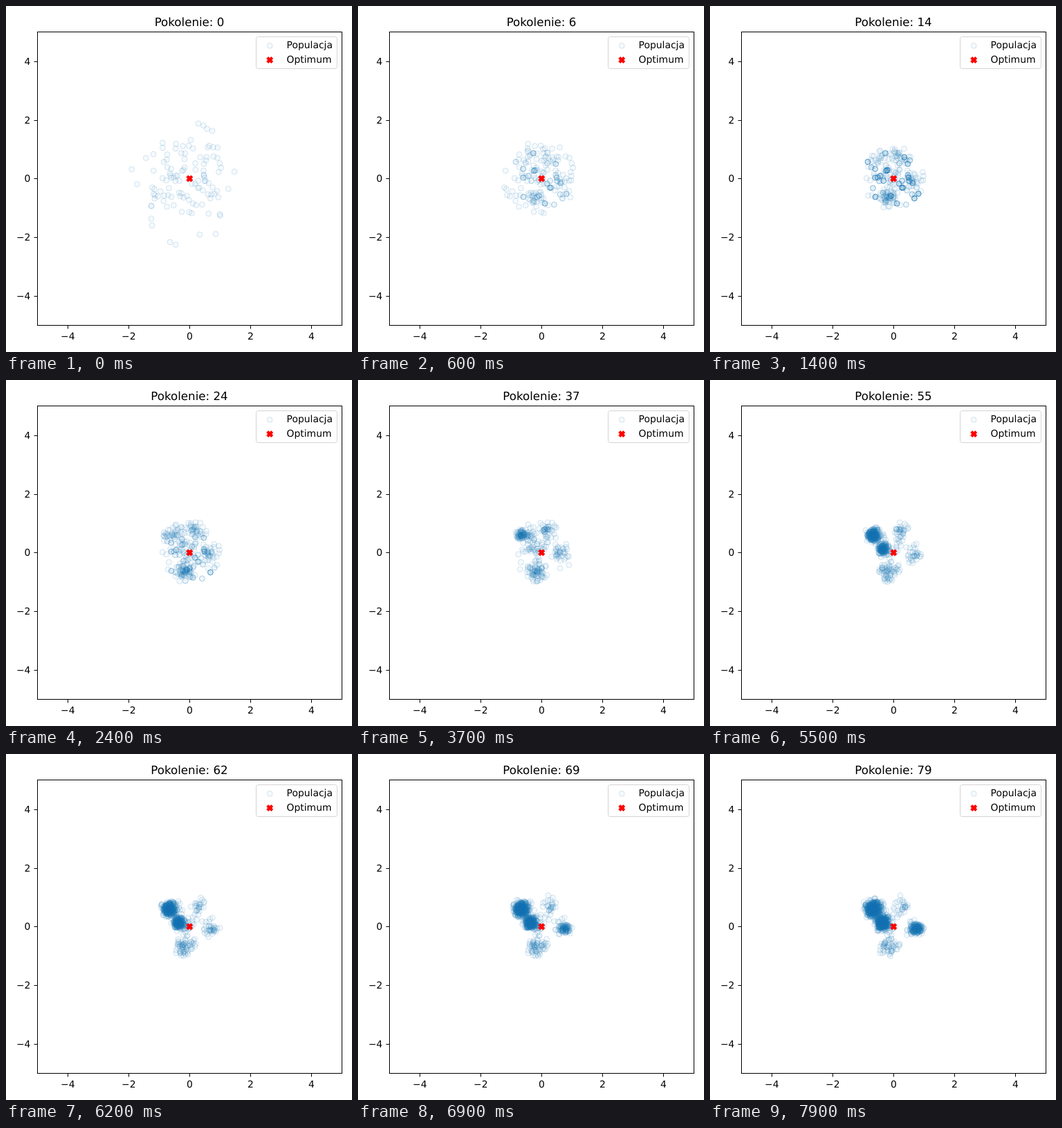
These frames come from a looping animation (500x500 px, 8000 ms). An HTML page with a canvas:

```html
<!DOCTYPE html>
<html lang="pl">
<head>
<meta charset="utf-8">
<title>Pokolenie</title>
<style>
  html, body { margin: 0; width: 100%; height: 100%; overflow: hidden; background: #fff; }
  canvas { display: block; width: 500px; height: 500px; }
</style>
</head>
<body>
<canvas id="plot" width="500" height="500"></canvas>
<script>
const ctx = document.getElementById('plot').getContext('2d');
const STEP = 100, GENERATIONS = 80;
const CX = 265, CY = 249.4, UX = 44, UY = 42.4;
const FONT = '"DejaVu Sans", sans-serif';

// Small groups that keep renewing themselves
const niches = [
  { x: 259, y: 277, births: 190 },
  { x: 275, y: 219, births: 100 },
  { x: 293, y: 252, births: 90 },
  { x: 240, y: 225, births: 90 },
  { x: 260, y: 245, births: 90 }
];

// Dense groups that start late and keep growing
const colonies = [
  { x: 236, y: 224, first: 32, rate: 10 },
  { x: 249, y: 244, first: 42, rate: 11 },
  { x: 298, y: 252, first: 61, rate: 8 }
];

let seed = 21;
function rand() {
  seed = (seed + 0x6D2B79F5) | 0;
  let t = Math.imul(seed ^ (seed >>> 15), 1 | seed);
  t = (t + Math.imul(t ^ (t >>> 7), 61 | t)) ^ t;
  return ((t ^ (t >>> 14)) >>> 0) / 4294967296;
}
const between = (a, b) => a + (b - a) * rand();

// Bell-shaped scatter with the far tail cut off
function scatter(x, y, spread, cut = 0.9) {
  const r = spread * Math.sqrt(-2 * Math.log(1 - cut * rand()));
  const a = between(0, 2 * Math.PI);
  return [x + r * Math.cos(a), y + r * Math.sin(a)];
}

const people = [];
const add = ([x, y], birth, death) => people.push({ x, y, birth, death });

// The first generation: the far ones die out, the near ones leave copies
function addFounders(count) {
  for (let i = 0; i < count; i++) {
    const spot = scatter(263, 254, 41, 0.95);
    const r = Math.hypot((spot[0] - CX) / UX, (spot[1] - CY) / UY);
    if (r > 1.03) {
      const near = Math.max(0, Math.min(1, (2.6 - r) / 1.6));
      add(spot, 0, Math.round(1 + 8 * near * near));
      continue;
    }
    add(spot, 0, between(18, 50));
    const copies = Math.floor(7 * rand() ** 2);
    for (let k = 0; k < copies; k++) add(spot, between(1, 13), between(15, 34));
  }
}

function addNiche({ x, y, births }) {
  for (let i = 0; i < births; i++) {
    const birth = 1 + 75 * rand() ** 1.4;
    add(scatter(x, y, 8), birth, birth + between(16, 40));
  }
}

function addColony({ x, y, first, rate }) {
  for (let i = 0; i < rate * (GENERATIONS - first); i++) {
    const age = i / rate;
    add(scatter(x, y, 3.6 + 0.1 * age), first + age, GENERATIONS);
  }
}

addFounders(112);
niches.forEach(addNiche);
colonies.forEach(addColony);
people.sort((a, b) => a.birth - b.birth);

function dot(x, y) {
  ctx.beginPath();
  ctx.arc(x, y, 3.9, 0, 2 * Math.PI);
  ctx.fillStyle = 'rgba(31,119,180,0.04)';
  ctx.fill();
  ctx.strokeStyle = 'rgba(31,119,180,0.18)';
  ctx.lineWidth = 1;
  ctx.stroke();
}

function cross(x, y) {
  const h = 4.17;
  ctx.beginPath();
  // Three corners per quarter turn
  for (let i = 0; i < 4; i++) {
    const c = [1, 0, -1, 0][i], s = [0, 1, 0, -1][i];
    for (const [u, v] of [[-0.5, -1], [0, -0.5], [0.5, -1]]) {
      ctx.lineTo(x + h * (u * c - v * s), y + h * (u * s + v * c));
    }
  }
  ctx.closePath();
  ctx.fillStyle = ctx.strokeStyle = '#f00';
  ctx.lineWidth = 1.2;
  ctx.fill();
  ctx.stroke();
}

function text(str, x, y, align, size = 13.89) {
  ctx.font = size + 'px ' + FONT;
  ctx.textRendering = 'geometricPrecision';
  ctx.textAlign = align;
  ctx.fillStyle = '#000';
  ctx.fillText(str, x, y);
}

function line(x1, y1, x2, y2) {
  ctx.beginPath();
  ctx.moveTo(x1, y1);
  ctx.lineTo(x2, y2);
  ctx.stroke();
}

function axes() {
  ctx.strokeStyle = '#000';
  ctx.lineWidth = 1;
  ctx.strokeRect(45.5, 37.5, 440, 424);
  for (let v = -4; v <= 4; v += 2) {
    const label = String(v).replace('-', '\u2212');
    const x = CX + v * UX + 0.5;
    const y = Math.round(CY - v * UY) + 0.5;
    line(x, 462, x, 466.5);
    line(40.5, y, 45, y);
    text(label, x - 0.2, 482, 'center');
    text(label, 35.4, y + 4.5, 'right');
  }
}

function legend() {
  ctx.beginPath();
  ctx.roundRect(361.5, 44.5, 117, 46, 3);
  ctx.fillStyle = 'rgba(255,255,255,0.8)';
  ctx.fill();
  ctx.strokeStyle = '#d4d4d4';
  ctx.lineWidth = 1;
  ctx.stroke();
  dot(381.2, 57.4);
  cross(381.2, 78);
  text('Populacja', 405.6, 61, 'left');
  text('Optimum', 405.6, 82, 'left');
}

function draw(gen) {
  ctx.fillStyle = '#fff';
  ctx.fillRect(0, 0, 500, 500);
  for (const p of people) {
    if (p.birth <= gen && gen < p.death) dot(p.x, p.y);
  }
  cross(CX + 0.3, CY);
  axes();
  text('Pokolenie: ' + gen, 265, 29, 'center', 16.67);
  legend();
}

let start = null, shown = 0;
function tick(now) {
  if (start === null) start = now;
  const gen = Math.floor((now - start) / STEP) % GENERATIONS;
  if (gen !== shown) draw(shown = gen);
  requestAnimationFrame(tick);
}
draw(0);
requestAnimationFrame(tick);
</script>
</body>
</html>
```
